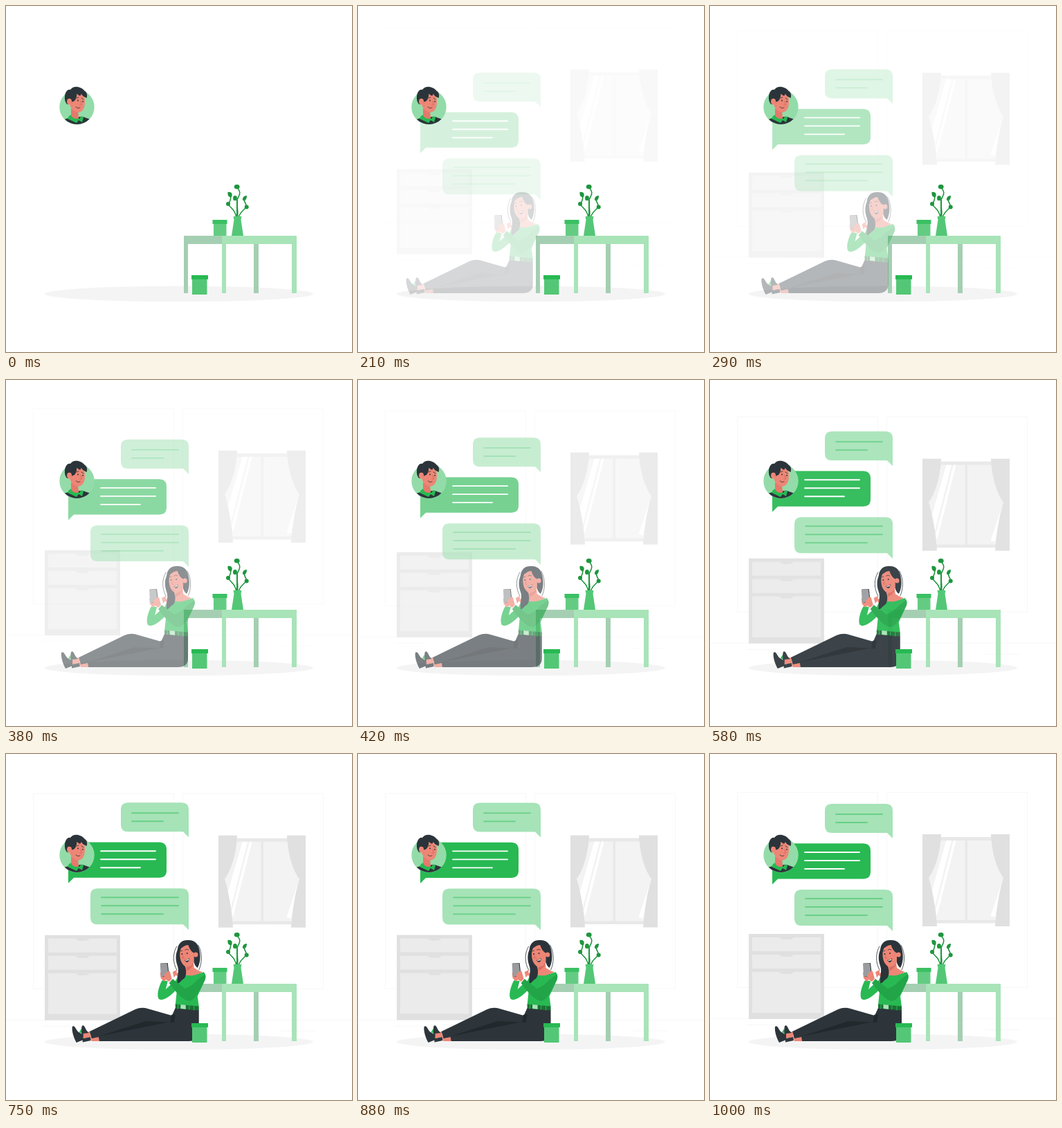
These frames come from a looping animation (500 by 500 pixels, 1040 ms). An HTML page:

```html
<!DOCTYPE html>
<html lang="en">
<head>
<meta charset="utf-8">
<title>Chat scene</title>
<style>
html, body { margin: 0; width: 100%; height: 100%; overflow: hidden; background: #fff; }
svg { display: block; width: 100vw; height: 100vh; }
.line { fill: none; stroke-linecap: round; }
</style>
</head>
<body>
<svg viewBox="0 0 500 500">
  <defs><clipPath id="badge"><path d="M77.500 146A25 25 0 0 0 127.500 146V110H77.500Z"/></clipPath></defs>

  <g data-from="0,-30" fill="none" stroke="#f7f7f7">
    <rect x="39.500" y="55.500" width="203" height="282"/>
    <rect x="255.500" y="55.500" width="203" height="282"/>
    <path d="M0 382.500H500M53 391.500H98M398 398.500H447"/>
  </g>

  <g data-from="0,-30">
    <rect x="56" y="260" width="109" height="123" fill="#e0e0e0"/>
    <path d="M61 265H160V285H61ZM61 290H160V310H61ZM61 315H160V374H61Z" fill="#ebebeb"/>
    <path d="M100 265H121C118 268 116 268 113 268H107C104 268 102 267 100 265ZM100 290H121C118 293 116 293 113 293H107C104 293 102 292 100 290ZM100 315H121C118 318 116 318 113 318H107C104 318 102 317 100 315Z" fill="#e0e0e0"/>
  </g>

  <g data-from="0,-30">
    <path d="M316 120H424V244.500H316Z" fill="#e8e8e8"/>
    <path d="M315 125H368.500V240H315ZM372 125H425V240H315V240H372Z" fill="#f3f3f3"/>
    <path d="M341.500 125H349L325 220L320 200ZM352 125H355.500L328 234L326 226ZM424 179L405.500 234L412 236Z" fill="#fff"/>
    <path d="M307 116H334C333 143 325 167 316 179C322 198 326 222 328 249H307Z" fill="#e0e0e0"/>
    <path d="M433 116H406C407 143 415 167 424 179C418 198 414 222 412 249H433Z" fill="#e0e0e0"/>
  </g>

  <ellipse cx="250" cy="416" rx="194" ry="11.300" fill="#f4f4f4"/>

  <g data-from="0,30">
    <path d="M176 72H254Q264 72 264 82V122L256 114H176Q166 114 166 104V82Q166 72 176 72Z" fill="#a6e3b7"/>
    <path class="line" d="M182 87H249M182 99H227" stroke="#69cf87" stroke-width="1.800"/>
  </g>
  <g data-from="0,30">
    <path d="M100 129.300H221Q232 129.300 232 140V170Q232 180.500 221 180.500H98L90 188.500V140Q90 129.300 100 129.300Z" fill="#28b953"/>
    <path class="line" d="M137 142H216M137 154H216M137 166H194" stroke="#fff" stroke-width="1.800"/>
  </g>
  <g data-from="0,30">
    <path d="M132 196H254Q264 196 264 206V256L256 248H132Q122 248 122 238V206Q122 196 132 196Z" fill="#a6e3b7"/>
    <path class="line" d="M138 209H249M138 221H249M138 233H227" stroke="#69cf87" stroke-width="1.800"/>
  </g>

  <!-- Avatar -->
  <circle cx="102.500" cy="146" r="25.200" fill="#93dca9"/>
  <g clip-path="url(#badge)">
    <path d="M78 166L93 161L111 160L128 166V174H78Z" fill="#2b343a"/>
    <path d="M91 159L96 156L106 163L109 159L112 161L110 168L105 165L102 169L89 163Z" fill="#28b953"/>
    <path d="M94 148V158Q98 165 105 162L104 151Z" fill="#e5796b"/>
    <path d="M92 131C97 123 111 122 113.500 132C115 143 113 152 106 153.500C100 154 94 150 92 142Z" fill="#ed8676"/>
    <path d="M94 139C89 147 84 139 85 130C86 123 90 120 93 121C97 114 109 116 114 123C117 125 118 129 116.500 133C113 131 110 130 109 127L107 130L102 127C103 133 99 138 97 138Z" fill="#2b343a"/>
    <ellipse cx="91.500" cy="138" rx="3.500" ry="4.300" fill="#ed8676"/>
    <g class="line" stroke="#2b343a" stroke-width=".8"><path d="M102 133L105 132M109 133L112 135M101 146Q104 149 107 147"/><path d="M108 138L109.500 143L107 143" stroke="#d56358"/></g>
    <circle cx="104" cy="136.500" r="1" fill="#2b343a"/><circle cx="111" cy="138" r=".9" fill="#2b343a"/>
  </g>

  <!-- Table -->
  <path d="M257 332H312V344H263V415H257ZM358 344H365V415H358Z" fill="#a4cfb2"/>
  <path d="M312 332H420V415H413V344H318V415H312Z" fill="#a8e4b8"/>

  <!-- Seated woman -->
  <g data-from="-30,0">
    <path d="M109 404L119 401L121 409L110 411ZM120 409L133 407V415L122 415Z" fill="#ed8676"/>
    <path d="M104 402L107 397L110 405Z" fill="#28b953"/>
    <path d="M94 394C97 391 99 397 102 401C106 404 108 404 109 406L110 413L100 417C96 410 93 400 94 394ZM108 393C111 390 113 397 115 400L118 403L110 404V411L120 409L121 414L109 416.500C109 409 106 400 108 393Z" fill="#2d353b"/>
    <path d="M132 408L201 385L241 387L243 367L277 370V402Q277 415 262 415H133Z" fill="#2d353b"/>
    <path d="M119 401L185 369Q194 365 203 368L238 378L243 367L247 388L205 387L132 409L122 411Z" fill="#2d353b"/>
    <path d="M132 408L200 386L241 388L243 376L237 377L236 387Z" fill="#22292d"/>

    <path d="M224 327C218 337 216 350 219 354C224 358 235 351 244 341L242 328L229 340L232 328Z" fill="#28b953"/>
    <path d="M246 322C251 319 257 318 262 320C270 319 278 317 284 315Q288 319 286 326L275 350L277 365L243 363L245 343L240 335Z" fill="#28b953"/>
    <path d="M286 318Q288 324 284 330C277 345 271 356 263 357C253 356 242 342 234 331L239 325L257 339Q269 334 274 327Z" fill="#22a548"/>
    <path d="M243 361.500L277 364.500V370.500L243 367.500Z" fill="#1c7034"/>
    <path d="M250.500 362L258 362.700V368.800L250.500 368.100Z" fill="#a6e3b7"/>
    <path class="line" d="M247 362V368M263 363V369M270 364V370" stroke="#28b953"/>

    <path d="M259 301L269 299L270 309Q275 313 282 315Q267 323 258 319L246 322L243 318L254 312Z" fill="#ed8676"/>
    <path d="M260 305L269 301L268 306Q264 312 259 313Z" fill="#d96d61"/>
    <path d="M246 283C247 273 253 269 260 269C272 268 277 276 278 285C280 296 278 304 275 309C272 307 270 303 269 298L266 286L252 280C247 293 254 300 257 307C260 315 258 323 255 325C251 327 249 332 246 331C245 322 249 314 246 306C243 298 243 290 246 283Z" fill="#2b343a"/>
    <path d="M250 284C252 279 257 276 262 276C264 281 267 285 270 286V299C268 306 262 309 258 307C252 305 248 295 250 284Z" fill="#ed8676"/>
    <path d="M261 273C263 284 269 288 272 288L276 284Q271 274 261 273Z" fill="#2b343a"/>
    <ellipse cx="272.500" cy="290" rx="3.200" ry="3.500" fill="#ed8676"/>
    <g class="line" stroke="#2b343a" stroke-width=".8"><path d="M245 278C239 288 239 301 245 312M276 276C283 289 281 304 277 312"/><path d="M250 285L253 284M257 283Q260 281 262 283"/><path d="M254 291L253 295H256" stroke="#d15c53"/></g>
    <circle cx="252.500" cy="289" r="1.100" fill="#2b343a"/><circle cx="260" cy="288" r="1.100" fill="#2b343a"/>
    <path d="M256 298Q260 298 263 295Q263 301 259 301Z" fill="#2b343a"/><path d="M257 298Q260 298 262.500 296L262 298L258 299Z" fill="#fff"/>

    <path d="M221 316L226 313L231 323L227 329L222 324Z" fill="#ed8676"/>
    <path d="M222 302.500L232 302L234 320L224 322Z" fill="#2b343a"/>
    <path d="M221 302.500L231 302.500L233 320L222 322Z" fill="#9a9b9e"/>
    <path d="M227 319L232 314H235L238 325L234 329L228 325ZM239 315L245 312V318L241 323Z" fill="#ed8676"/>
  </g>

  <!-- Pots and plant -->
  <path d="M300 314H318.500V332H300Z" fill="#63cc82"/>
  <path d="M298.500 309H319.500V315H298.500Z" fill="#3bc063"/>
  <path d="M269 394H290.500V417H269Z" fill="#53c776"/>
  <path d="M268 389H292V395H268Z" fill="#28b953"/>
  <g class="line" stroke="#1d963e" stroke-width="1.600">
    <path d="M333.500 262C341 270 337 273 334 280C333 289 336 294 334.500 306" />
    <path d="M324 274C327 280 320 284 323 289C328 294 332 298 333 306M345 277C342 283 349 286 347 291C341 297 338 299 336 306"/>
    <path d="M334 281L334 306" stroke-width="2"/>
  </g>
  <g fill="#1d963e">
    <ellipse cx="333.700" cy="261.300" rx="3.900" ry="3.300"/>
    <ellipse cx="331" cy="277.700" rx="3" ry="3.600"/>
    <circle cx="321" cy="286" r="3"/><circle cx="347.700" cy="290.500" r="3"/>
    <path d="M320.500 269C326 268 328 272 326 276C322 277 320 274 320.500 269ZM348 274C343 274 341 278 342.500 281C346 282 348 279 348 274Z"/>
  </g>
  <path d="M328.500 304H340.500L339.500 309L343 332H326L329.500 309Z" fill="#53c776"/>
</svg>

<script>
const LOOP = 1040, FPS = 24;
const parts = [...document.querySelectorAll('[data-from]')].map(el => ({
  el, from: el.dataset.from.split(',').map(Number)
}));

const bezier = (a, b, s) => 3 * (1 - s) ** 2 * s * a + 3 * (1 - s) * s * s * b + s ** 3;

// Slide easing that overshoots before settling.
function ease(x) {
  let lo = 0, hi = 1;
  for (let i = 0; i < 24; i++) {
    const mid = (lo + hi) / 2;
    if (bezier(0.36, 0.5, mid) < x) lo = mid; else hi = mid;
  }
  return bezier(-0.01, 1.38, lo);
}

function draw(ms) {
  const step = Math.floor((ms % LOOP + 5) * FPS / 1000);
  const x = step ? Math.min(1, 1.02 * step / FPS + 0.017) : 0;
  const p = x < 1 ? ease(x) : 1;
  for (const { el, from: [dx, dy] } of parts) {
    el.setAttribute('transform', `translate(${dx * (1 - p)} ${dy * (1 - p)})`);
    el.setAttribute('opacity', Math.max(0, Math.min(1, p)));
  }
}

let start;
function tick(now) {
  start ??= now;
  draw(now - start);
  requestAnimationFrame(tick);
}
draw(0);
requestAnimationFrame(tick);
</script>
</body>
</html>
```
